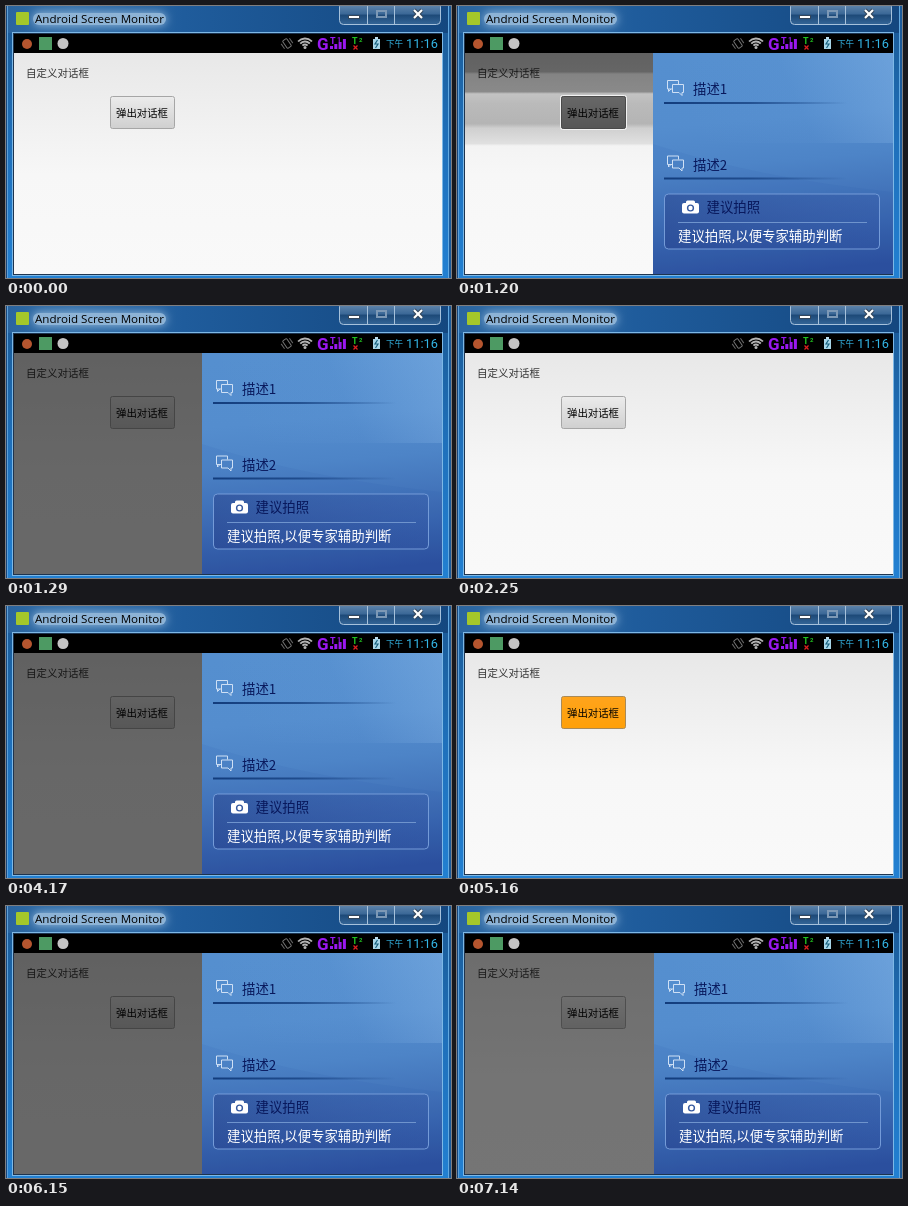
An HTML page with a canvas that plays this animation: 445x272 px, repeating every 7.2 s.

```html
<!DOCTYPE html>
<html lang="zh-CN">
<head>
<meta charset="utf-8">
<title>Screen monitor</title>
<style>
html, body { margin: 0; width: 100%; height: 100%; overflow: hidden; background: #17589c; }
canvas { display: block; }
</style>
</head>
<body>
<canvas id="stage" width="445" height="272"></canvas>
<script>
const ctx = document.getElementById('stage').getContext('2d');
const LOOP = 7200;
const CJK = '"Noto Sans CJK SC", "Noto Sans CJK", sans-serif';
const LATIN = 'Roboto, sans-serif';

const page = {};
const pressed = { pressed: true };
const opening = { panel: 0, partial: true };
const dialog = { panel: 0, dim: 0.58 };
const closing = { panel: 1, dim: 0.53 };

// [start, view]
const timeline = [
  [0, page], [1200, opening], [1290, dialog], [2250, page], [3210, dialog],
  [5160, pressed], [6150, dialog], [7140, closing]
];

function gradient(x0, y0, x1, y1, stops) {
  const g = ctx.createLinearGradient(x0, y0, x1, y1);
  stops.forEach(([at, color]) => g.addColorStop(at, color));
  return g;
}

function rect(x, y, w, h, fill) {
  ctx.fillStyle = fill;
  ctx.fillRect(x, y, w, h);
}

function rounded(x, y, w, h, r, fill, stroke) {
  ctx.beginPath();
  ctx.roundRect(x, y, w, h, r);
  if (fill) { ctx.fillStyle = fill; ctx.fill(); }
  if (stroke) { ctx.strokeStyle = stroke; ctx.lineWidth = 1; ctx.stroke(); }
}

function circle(x, y, r, fill) {
  ctx.beginPath();
  ctx.arc(x, y, r, 0, Math.PI * 2);
  ctx.fillStyle = fill;
  ctx.fill();
}

function line(points, color, width = 1) {
  ctx.beginPath();
  points.forEach(([x, y]) => ctx.lineTo(x, y));
  ctx.strokeStyle = color;
  ctx.lineWidth = width;
  ctx.stroke();
}

function text(str, x, y, size, color, family = CJK, weight = 400) {
  ctx.font = `${weight} ${size}px ${family}`;
  ctx.fillStyle = color;
  ctx.fillText(str, x, y);
}

function drawWindow() {
  rect(0, 0, 445, 272, gradient(0, 0, 0, 272,
    [[0, '#1a5595'], [0.15, '#1c609f'], [0.5, '#1f70bb'], [1, '#2280d2']]));
  rect(0, 0, 445, 27, gradient(0, 0, 445, 0,
    [[0, '#2a649f'], [0.15, '#336fa9'], [0.4, '#1f5c9c'], [1, '#14477f']]));

  // soft halo behind the title
  ctx.save();
  ctx.shadowColor = '#9cbfdf';
  ctx.shadowBlur = 10;
  rounded(27, 7, 133, 12, 6, '#8db3d6');
  ctx.restore();

  rect(0, 0, 1, 272, '#16467c');
  rect(1, 0, 1, 272, '#5f9fd6');
  rect(442, 0, 1, 272, '#63a9e0');
  rect(443, 0, 2, 272, '#1c5a99');
  rect(6, 26, 431, 244, '#7db8e6');
  rect(7, 27, 429, 242, '#1d3450');

  rounded(10, 6, 13, 13, 1, '#a4c72a');
  text('Android Screen Monitor', 29, 17, 11.6, '#000',
    '"Open Sans", "Noto Sans", sans-serif');
  drawCaptionButtons();
}

function drawCaptionButtons() {
  rounded(333.5, -3.5, 101, 22, 4, gradient(0, 0, 0, 18,
    [[0, '#5b82aa'], [0.45, '#3a6796'], [0.5, '#1d4977'], [1, '#336496']]), '#a6c1db');
  rect(361, 0, 1, 18, '#a6c1db');
  rect(388, 0, 1, 18, '#a6c1db');
  rect(342, 9, 12, 4, '#34465a');
  rect(343, 10, 10, 2, '#fff');
  ctx.strokeStyle = '#7d99b6';
  ctx.lineWidth = 2;
  ctx.strokeRect(371, 5, 9, 6);
  for (const [color, width] of [['#34465a', 4], ['#fff', 2.2]]) {
    line([[408, 4], [416, 12]], color, width);
    line([[416, 4], [408, 12]], color, width);
  }
}

function drawStatusBar() {
  rect(8, 28, 428, 19, '#000');
  circle(21, 38, 5, '#b5552f');
  rect(33, 31, 13, 13, '#4d9a63');
  circle(57, 37.5, 5.5, '#c4c4c4');

  // vibrate
  ctx.save();
  ctx.translate(281, 37.5);
  ctx.rotate(-0.6);
  rounded(-2.5, -4.5, 5, 9, 1, null, '#777');
  line([[-5, -3], [-5, 3]], '#666');
  line([[5, -3], [5, 3]], '#666');
  ctx.restore();

  // wifi
  for (const r of [3.5, 6.5, 9.5]) {
    ctx.beginPath();
    ctx.arc(299, 42, r, -Math.PI * 0.76, -Math.PI * 0.24);
    ctx.strokeStyle = '#b4b4b4';
    ctx.lineWidth = 1.8;
    ctx.stroke();
  }
  circle(299, 41.5, 1.5, '#b4b4b4');

  // cell signals
  text('G', 311, 43.5, 17, '#9a18f0', LATIN, 700);
  text('T', 324, 38, 9, '#9a18f0', LATIN, 700);
  text('1', 331, 36, 7, '#9a18f0', LATIN, 700);
  [3, 5, 7, 10].forEach((h, i) => rect(324 + i * 4.3, 43 - h, 3, h, '#9a18f0'));
  text('T', 346, 38, 9, '#22c322', LATIN, 700);
  text('2', 353, 36, 6, '#22c322', LATIN, 700);
  line([[347.5, 39.5], [351.5, 43.5]], '#e02020', 1.3);
  line([[351.5, 39.5], [347.5, 43.5]], '#e02020', 1.3);

  // battery
  rect(369, 31, 3, 2, '#bcdcea');
  rect(367, 33, 7, 10, '#a8d5e8');
  line([[371.5, 34], [369, 38], [372, 38], [369.5, 42]], '#17617f', 1.2);

  text('下午', 380, 41, 8.6, '#33b5e5');
  text('11:16', 400, 42, 12.8, '#33b5e5', LATIN);
}

function drawButton(stops, border) {
  rounded(104.5, 90.5, 64, 32, 2, gradient(0, 90, 0, 123, stops), border);
  text('弹出对话框', 110, 110.5, 10.4, '#000');
}

function drawPage(isPressed) {
  rect(8, 47, 428, 221, gradient(0, 47, 0, 268,
    [[0, '#e8e8e8'], [0.55, '#f7f7f7'], [1, '#f9f9f9']]));
  text('自定义对话框', 20, 71, 10.5, '#333');
  if (isPressed) drawButton([[0, '#ffa41c'], [1, '#ffa008']], '#a98a58');
  else drawButton([[0, '#ececec'], [0.5, '#dedede'], [1, '#cfcfcf']], '#a6a6a6');
}

function drawPartialDim() {
  const dark = a => `rgba(0,0,0,${a})`;
  rect(8, 47, 188, 221, gradient(0, 47, 0, 268,
    [[0, dark(0.58)], [0.085, dark(0.57)], [0.095, dark(0.44)], [0.175, dark(0.42)],
     [0.185, dark(0.18)], [0.23, dark(0.22)], [0.32, dark(0.25)], [0.34, dark(0.14)],
     [0.41, dark(0.08)], [0.42, dark(0)], [1, dark(0)]]));
  rounded(103.5, 89.5, 66, 34, 2, null, '#f2f2f2');
  drawButton([[0, '#686868'], [1, '#565656']], '#4a4a4a');
}

function drawRow(label, y) {
  const ink = '#cfe0f5';
  line([[215, y], [210.5, y], [210.5, y - 8.5], [221.5, y - 8.5], [221.5, y - 5]], ink);
  line([[211.5, y], [211.5, y + 2.5], [214, y]], ink);
  line([[215.5, y - 4.5], [226.5, y - 4.5], [226.5, y + 3.5], [225, y + 3.5],
    [225, y + 6.5], [222, y + 3.5], [215.5, y + 3.5], [215.5, y - 4.5]], ink);
  text(label, 236, y + 5, 13.4, '#08185c');
  rect(207, y + 13, 216, 2, gradient(207, 0, 423, 0,
    [[0, '#123c7c'], [0.4, 'rgba(18,60,124,0.75)'], [0.85, 'rgba(18,60,124,0)']]));
}

function drawCamera() {
  rounded(225, 197, 17, 10.5, 2, '#fff');
  rounded(229, 194.5, 9, 5, 1.5, '#fff');
  circle(233.5, 202, 3.6, '#35599f');
  circle(233.5, 202, 2.2, '#fff');
}

function drawPanel(shift) {
  ctx.save();
  ctx.beginPath();
  ctx.rect(8, 47, 428, 221);
  ctx.clip();
  ctx.translate(shift, 0);
  rect(196, 47, 240, 221, gradient(290, 47, 310, 268,
    [[0, '#558fcf'], [0.3, '#548dce'], [0.5, '#4d84c7'], [0.65, '#4476bc'],
     [0.82, '#3864ae'], [1, '#2c509e']]));
  rect(196, 47, 240, 90, gradient(240, 137, 436, 47,
    [[0, 'rgba(150,195,240,0)'], [0.5, 'rgba(150,195,240,0.04)'], [1, 'rgba(150,195,240,0.35)']]));

  // darker wave across the lower part
  ctx.beginPath();
  ctx.moveTo(196, 138);
  ctx.quadraticCurveTo(300, 172, 436, 186);
  ctx.lineTo(436, 268);
  ctx.lineTo(196, 268);
  ctx.fillStyle = 'rgba(30,70,150,0.07)';
  ctx.fill();

  drawRow('描述1', 83);
  drawRow('描述2', 158.5);
  rounded(207.5, 188, 215, 55, 4, gradient(207, 188, 423, 243,
    [[0, 'rgba(30,50,125,0.4)'], [1, 'rgba(50,80,160,0.25)']]), '#749bd8');
  drawCamera();
  text('建议拍照', 249.5, 206, 13.4, '#08185c');
  rect(221, 216, 189, 1, '#6f94cd');
  text('建议拍照,以便专家辅助判断', 221, 235, 13.4, '#fff');
  ctx.restore();
}

function draw(view) {
  drawWindow();
  drawStatusBar();
  drawPage(view.pressed);
  if (view.partial) drawPartialDim();
  if (view.dim) rect(8, 47, 428, 221, `rgba(0,0,0,${view.dim})`);
  if (view.panel !== undefined) drawPanel(view.panel);
}

const start = performance.now();
function tick(now) {
  const t = Math.max(0, now - start) % LOOP;
  draw(timeline.filter(([at]) => at <= t).pop()[1]);
  requestAnimationFrame(tick);
}
tick(start);
</script>
</body>
</html>
```
